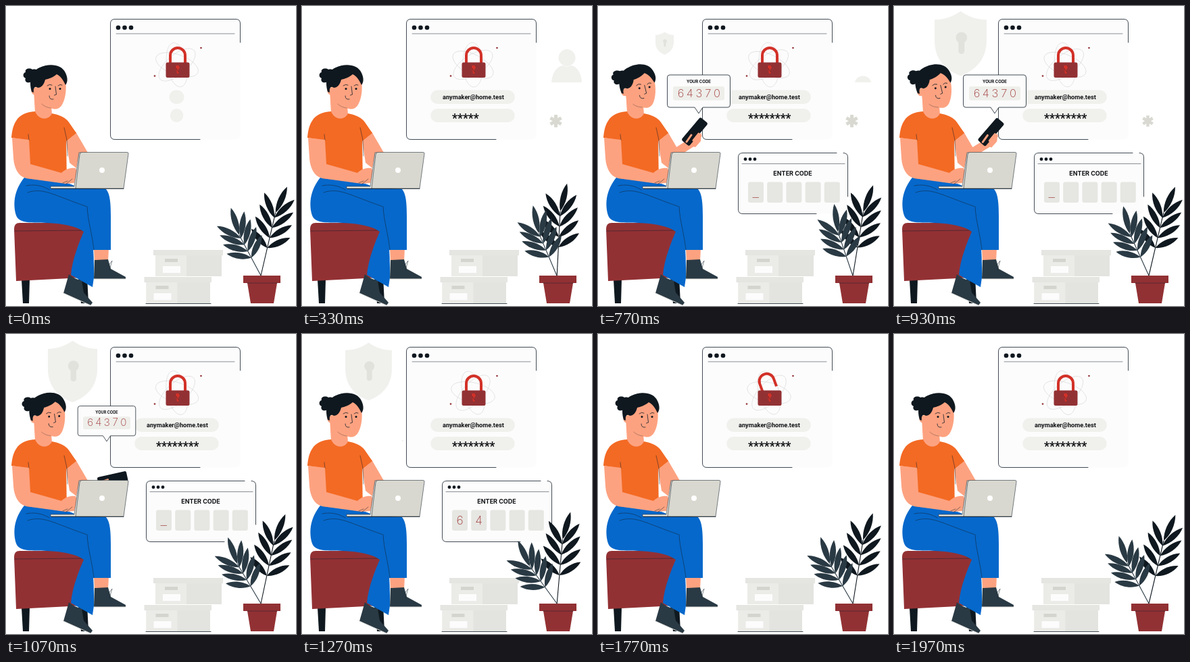
These frames come from a looping animation (429 px wide and 444 px high, 2010 ms). An HTML page:

```html
<!DOCTYPE html>
<html lang="en">
<head>
<meta charset="utf-8">
<title>Two-step sign in</title>
<style>
html, body { margin: 0; width: 100%; height: 100%; overflow: hidden; background: #fff; }
svg { display: block; width: 429px; height: 444px; }
text { font-family: Inter, sans-serif; fill: #101214; }
.roboto { font-family: Roboto, sans-serif; }
.mid { text-anchor: middle; }
.code { font-weight: 200; fill: #a03a3a; text-anchor: middle; }
.skin { fill: #fda280; }
.ink { fill: #0f181f; }
.slate { fill: #2a3a44; }
.red { fill: #923134; }
.blue { fill: #0668cb; }
.orange { fill: #f36a24; }
.pale { fill: #f0f0ed; }
.line, .thin { fill: none; stroke: #14202a; stroke-width: .8; stroke-linecap: round; }
.thin { stroke-width: .5; }
</style>
</head>
<body>
<svg viewBox="0 0 429 444">
  <defs>
    <clipPath id="iconClip"><rect x="360" y="50" width="66" height="63"/></clipPath>
  </defs>

  <g id="shield">
    <path class="pale" d="M98.500 10C87 18 75 22 62 22V52C62 77 77 93 98.500 101C120 93 135 77 135 52V22C122 22 110 18 98.500 10Z"/>
    <path fill="#e2e2dd" d="M95.500 54A8 8 0 1 1 104 54V66A4.200 4.200 0 0 1 95.500 66Z"/>
  </g>

  <g clip-path="url(#iconClip)">
    <g id="avatar" class="pale">
      <circle cx="392" cy="76.500" r="12.500"/>
      <path d="M369 113C370 98 378 89 386 88Q392 91 398 88C406 89 413 98 414 113Z"/>
    </g>
  </g>
  <path id="asterisk" stroke="#d9d9d2" stroke-width="5" d="M375.500 161V179.500M367.500 165.600L383.500 174.900M367.500 174.900L383.500 165.600"/>

  <!-- sign-in window -->
  <rect x="154.500" y="19.500" width="192" height="178" rx="7" fill="#fcfcfc"/>
  <path class="line" d="M346.500 54V26Q346.500 19.500 340 19.500H161Q154.500 19.500 154.500 26V191Q154.500 197.500 161 197.500H287"/>
  <path class="thin" d="M163 41H338"/>
  <g class="ink"><circle cx="166" cy="32" r="3.300"/><circle cx="175.500" cy="32" r="3.300"/><circle cx="185" cy="32" r="3.300"/></g>
  <g id="orbits" fill="none" stroke="#d6d6d6" stroke-width=".6"></g>
  <g class="red"><circle cx="288.500" cy="62" r="1.300"/><circle cx="220" cy="103.500" r="1.300"/></g>
  <path id="shackle" fill="none" stroke="#d23128" stroke-width="4" d="M243 85V73A11 11 0 0 1 265 73V85"/>
  <rect class="red" x="236.500" y="83.500" width="35" height="22.500" rx="2.500"/>
  <path fill="#d23128" d="M252 94A3.300 3.300 0 1 1 255 94L255.500 100H253Z"/>
  <path class="thin" d="M250 90L255 97"/>
  <rect id="pillA" class="pale" y="124.500" height="20.500" rx="10.250"/>
  <rect id="pillB" class="pale" y="152" height="20" rx="10"/>
  <text id="email" class="roboto" x="208" y="137.700" font-size="9.200" font-weight="600"></text>
  <text id="stars" class="roboto" x="222" y="171.500" font-size="17.500" font-weight="700"></text>

  <!-- code window -->
  <g id="codeWindow">
    <rect x="207.500" y="217.500" width="162" height="90" rx="6" fill="#fcfcfc"/>
    <path class="line" d="M369.500 282V224Q369.500 217.500 363 217.500M353 217.500H214Q207.500 217.500 207.500 224V301Q207.500 307.500 214 307.500H323"/>
    <path class="thin" d="M213 233.500H365"/>
    <g class="ink"><circle cx="218" cy="226.700" r="2.400"/><circle cx="225" cy="226.700" r="2.400"/><circle cx="232" cy="226.700" r="2.400"/></g>
    <text class="mid" x="288" y="251" font-size="9" font-weight="700">ENTER CODE</text>
    <g id="slots" fill="#e6e6e2"></g>
    <path id="cursor" fill="none" stroke="#a03a3a" stroke-width=".7" d="M228.500 283.500H238"/>
    <g id="digits" font-size="17.500"></g>
  </g>

  <g id="boxes"></g>
  <path class="line" d="M207 440.500H303"/>

  <!-- plant -->
  <g id="backPlant" class="ink" stroke="#0f181f"></g>
  <g id="frontPlant" class="slate" stroke="#2a3a44"></g>
  <path class="red" d="M351 399H406V410H401L396 440H362L357 410H351Z"/>
  <path class="thin" d="M357 410H401"/>

  <!-- seat -->
  <path class="ink" d="M23 405H35L34 440H25ZM107 400H120L122 440H111Z"/>
  <path class="red" d="M12 330Q12 321 20 321H100L117 334L113 402L15 407Z"/>
  <path class="thin" d="M13 333L114 332"/>

  <!-- raised forearm with phone -->
  <g id="forearm">
    <path stroke="#fda280" stroke-width="13" stroke-linecap="round" d="M109 221L139 202"/>
    <path class="skin" d="M127 203L131 193L139 197L153 188L152 200L144 209Z"/>
    <rect class="ink" x="121" y="178.500" width="44" height="15" rx="2.500" transform="rotate(-50 143 186)"/>
    <path fill="none" stroke="#fda280" stroke-width="3" stroke-linecap="round" d="M131 201L138 191M143 202L152 192M141 199L149 189"/>
  </g>

  <!-- person -->
  <path class="skin" d="M89 199L103 186L121 217L108 219L104 240L94 232Z"/>
  <path class="skin" d="M130 358H152L151 378H131Z"/>
  <path class="slate" d="M131 376L151 375L155 389L177 401V404H130ZM93 397Q102 405 112 406L115 424L128 439L125 443L85 425Z"/>
  <path fill="none" stroke="#dededa" stroke-width="1" d="M130 404H177M85 425L125 443"/>
  <path class="thin" d="M151 385L157 377L153 391"/>
  <path class="blue" d="M95 268L148 271C154 278 155 292 155 312V361L129 361L116 295Z"/>
  <path class="blue" d="M27 254L90 262C108 267 119 277 120 296C126 320 131 360 130 402L128 416L96 398C98 375 108 350 115 334C105 326 85 322 60 321C40 320 20 323 15 310C9 290 14 270 27 254Z"/>
  <path class="thin" d="M30 266C44 263 56 267 64 272M32 276C55 268 70 280 120 297C121 318 128 340 130 361"/>
  <path class="skin" d="M41 125L66 135L68 160L60 171H48L43 158Z"/>
  <path class="orange" d="M43 156C48 169 63 170 68 159C80 161 89 166 93 172L104 188L89 200L90 262L30 255L34 199L8 195C9 183 11 176 15 170C20 161 30 157 43 156Z"/>
  <path class="thin" d="M86 180L90 198L91 222M34 199L33 190"/>
  <path class="skin" d="M9 195L34 198L36 234L82 247C88 241 96 239 103 240L105 245L101 262L88 263L30 255C18 252 12 240 11 225Z"/>
  <path class="thin" d="M84 262L91 259M88 264L98 256"/>
  <g id="head">
    <path class="ink" d="M38 112C30 116 27 110 29 107C24 105 25 99 29 98C27 93 35 91 39 94C46 92 50 97 49 102Z"/>
    <path class="skin" d="M44 118L58 104L74 97L87 106C90 118 89 134 84 144C80 153 73 154 66 151L54 146L44 135Z"/>
    <circle class="skin" cx="43" cy="126" r="5.500"/>
    <path class="ink" d="M38 127C33 110 38 96 50 91C62 85 82 85 88 99C91 105 92 112 88 117C85 110 81 104 75 101C69 106 63 108 58 109C56 117 52 121 47 121C43 118 40 121 41 128Z"/>
    <g class="ink"><circle cx="65" cy="122.500" r="1.500"/><circle cx="80" cy="122.500" r="1.500"/></g>
    <path class="line" d="M61 118Q64 115 68 117M77 118Q80 115 83 117M73 119L74.500 131L71.500 132M64 133Q64 139 70 138"/>
    <path class="thin" d="M53 145Q58 150 66 151" opacity=".6"/>
  </g>

  <!-- laptop -->
  <path fill="#e5e5df" stroke="#26323a" stroke-width=".6" d="M66 267H101L108 217H113L106 270H66Z"/>
  <path fill="#d8d8d0" stroke="#26323a" stroke-width=".6" d="M112 216.500H179Q181.500 216.500 181 219L174 270H103L109 220Q109.500 216.500 112 216.500Z"/>
  <circle cx="142" cy="243" r="4" fill="#fff"/>
  <path class="line" d="M67 270.500H174"/>

  <g id="bubble">
    <path fill="#fcfcfc" stroke="#14202a" stroke-width=".8" d="M106 102H192Q195.500 102 195.500 106V146Q195.500 150 192 150H155L149 159L143 150H106Q102.500 150 102.500 146V106Q102.500 102 106 102Z"/>
    <text class="mid" x="149" y="114.300" font-size="6.100" font-weight="700">YOUR CODE</text>
    <rect x="111" y="119" width="76" height="20.500" rx="3" fill="#eeeeea"/>
    <g id="sentCode" font-size="16.500"></g>
  </g>
</svg>
<script>
const LOOP = 2010;
const EMAIL = "anymaker@home.test";
const CODE = "64370";
const $ = id => document.getElementById(id);
const clamp = (v, lo, hi) => Math.min(hi, Math.max(lo, v));
const smooth = p => (1 - Math.cos(Math.PI * p)) / 2;
const overshoot = p => 1 + 2.2 * (p - 1) ** 3 + 1.2 * (p - 1) ** 2;

const ramp = (t, from, to, ease = smooth) => ease(clamp((t - from) / (to - from), 0, 1));

// Goes 0 -> 1 when entering and back to 0 when leaving.
const show = (t, enter, entered, leave, left, ease = smooth) =>
  t < leave ? ramp(t, enter, entered, ease) : ramp(t, left, leave, ease);

const typed = (t, start, step, length) => clamp(Math.floor((t - start) / step), 0, length);

const rotate = (id, angle, x, y) => $(id).setAttribute("transform", `rotate(${angle} ${x} ${y})`);
const toggle = (el, on) => { el.style.display = on ? "" : "none"; };

function scale(id, s, x, y) {
  $(id).setAttribute("transform", `translate(${x} ${y}) scale(${s}) translate(${-x} ${-y})`);
  toggle($(id), s > 0.005);
}

function setPill(id, width) {
  $(id).setAttribute("x", 252.5 - width / 2);
  $(id).setAttribute("width", width);
}

function spreadCode(id, x, y, pitch) {
  $(id).innerHTML = [...CODE].map((digit, i) =>
    `<text class="code" x="${x + i * pitch}" y="${y}">${digit}</text>`).join("");
}

const leaf = (x, y, angle, length) =>
  `<path stroke="none" transform="translate(${x} ${y}) rotate(${angle})"
    d="M0 0C${length * .3} -6 ${length * .7} -6 ${length} 0C${length * .7} 6 ${length * .3} 6 0 0Z"/>`;

// A stem with a leaf at its tip and pairs that open wider towards the root.
function growPlant(id, tipX, tipY) {
  const dx = tipX - 377, dy = tipY - 399;
  const aim = Math.atan2(dy, dx) * 180 / Math.PI;
  let parts = `<path d="M377 399L${tipX} ${tipY}" stroke-width="1.1"/>` + leaf(tipX, tipY, aim + 11, 42);
  for (let i = 0; i < 4; i++) {
    const along = .92 - .16 * i, spread = 35 + 6 * i;
    for (const side of [-1, 1]) {
      parts += leaf(377 + dx * along, 399 + dy * along, aim + side * spread, 40 - i);
    }
  }
  $(id).innerHTML = parts;
}

const rect = (x, y, w, h, fill) => `<rect x="${x}" y="${y}" width="${w}" height="${h}" fill="${fill}"/>`;

const box = (x, y, width) =>
  rect(x + 3, y + 7, width - 5, 32, "#e3e3df") +
  rect(x + 3, y + 7, 46, 32, "#ebebe8") +
  rect(x, y, width, 8, "#e5e5e1") +
  rect(x + 17, y + 13, 19, 5, "#d5d5cf") +
  rect(x + 14, y + 24, 26, 10, "#fcfcfc");

growPlant("backPlant", 399, 306);
growPlant("frontPlant", 345, 339);
$("boxes").innerHTML = box(218, 361, 103) + box(204.5, 401, 99.5);
$("slots").innerHTML = [...CODE].map((_, i) =>
  `<rect x="${222 + i * 28.2}" y="260.500" width="23" height="30.500" rx="3"/>`).join("");
$("orbits").innerHTML = [-40, 20, 80].map(angle =>
  `<ellipse cx="253" cy="87" rx="33" ry="15" transform="rotate(${angle} 253 87)"/>`).join("");
spreadCode("digits", 233.5, 282, 28.2);
spreadCode("sentCode", 122.5, 134.5, 13.4);

function draw(t) {
  setPill("pillA", 22 + 102.5 * ramp(t, 0, 200));
  setPill("pillB", 19.5 + 105 * ramp(t, 0, 230));
  $("email").textContent = EMAIL.slice(0, typed(t, 90, 10, EMAIL.length));
  $("stars").textContent = "*".repeat(typed(t, 175, 30, 8));

  $("avatar").setAttribute("transform", `translate(0 ${50 - 50 * show(t, 30, 260, 590, 850)})`);
  scale("asterisk", show(t, 130, 300, 800, 1000, overshoot), 375.5, 170);
  scale("shield", show(t, 740, 1050, 1080, 1390, overshoot), 98.5, 55);

  const phone = show(t, 490, 690, 910, 1240);
  rotate("forearm", 78 * (1 - phone), 108, 222);
  toggle($("forearm"), phone > 0);
  rotate("head", -6.5 * show(t, 490, 690, 910, 1180), 56, 155);
  scale("bubble", show(t, 560, 750, 1020, 1300), 149, 159);

  scale("codeWindow", show(t, 520, 720, 1620, 1770, overshoot), 288.5, 262.5);
  const entered = typed(t, 1100, 60, CODE.length);
  [...$("digits").children].forEach((digit, i) => toggle(digit, i < entered));
  toggle($("cursor"), entered === 0);

  rotate("shackle", -20 * show(t, 1620, 1730, 1800, 1930), 243, 84);
  rotate("orbits", 9 * Math.sin(2 * Math.PI * t / LOOP), 253, 87);

  rotate("backPlant", 6.2 * (Math.cos(4 * Math.PI * (t + 40) / LOOP) - 1), 377, 398);
  const sway = 10.5 * ramp(t, 0, 670) - 18.5 * ramp(t, 670, 1300) + 8 * ramp(t, 1300, LOOP);
  rotate("frontPlant", sway, 377, 398);
}

const start = performance.now();
function tick() {
  draw((performance.now() - start) % LOOP);
  requestAnimationFrame(tick);
}
tick();
</script>
</body>
</html>
```
